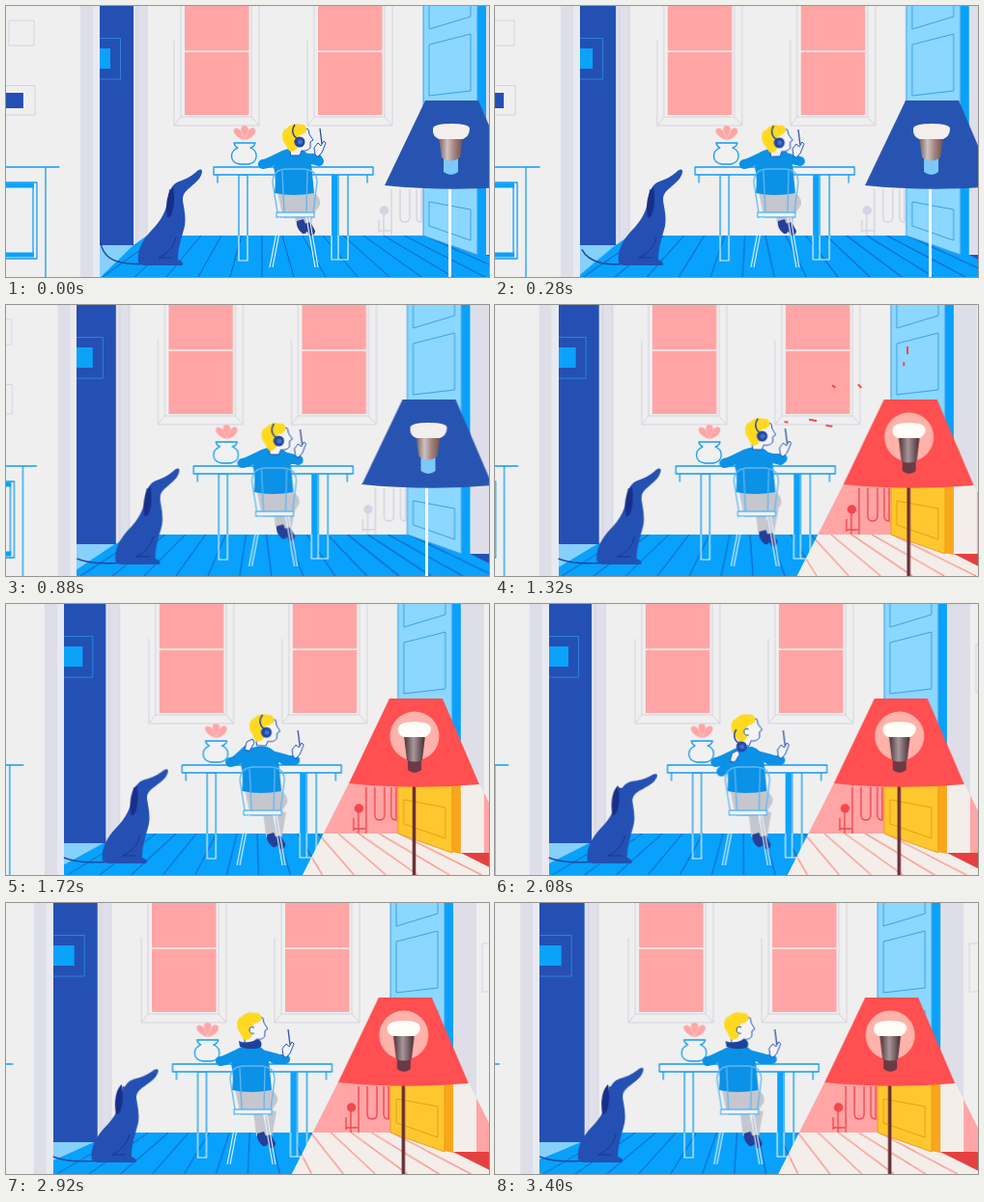
These frames come from a looping animation (500 by 281 pixels, 3440 ms). An HTML page:

```html
<!DOCTYPE html>
<html lang="en">
<head>
<meta charset="utf-8">
<title>Desk lamp</title>
<style>
html, body { margin: 0; width: 100%; height: 100%; overflow: hidden; background: #efefef; }
svg { display: block; width: 100vw; height: 100vh; }
svg * { animation-duration: 3.44s; animation-iteration-count: infinite; }

/* Parallax layers: each drifts left by --dx */
.pan { animation-name: pan; animation-timing-function: cubic-bezier(.2,.47,.5,.85); transform-origin: 0 245px; }
@keyframes pan { to { transform: translateX(var(--dx)) skewX(var(--sk, 0deg)); } }
.wall { --dx: -36px; }
.boards { --dx: -38px; --sk: -19deg; }
.hall { --dx: -39.5px; }
.sill { --dx: -39.5px; --sk: -53deg; }
.near { --dx: -51px; }
.vase { --dx: -40.5px; }
.desk { --dx: -45px; }
.man { --dx: -46.5px; }

/* Room colours, unlit and lit */
#room { --paint: #efefef; --floor: #08a1fb; --seam: #0d63c4; --door: #8bd7ff; --panel: #3f9fe8; --edge: #08a1fb; --jamb: #dedee9; --yard: #2450b3; --pipe: #d3d3e4; }
#lit { --paint: #ffa5a5; --floor: #f3eeea; --seam: #ff8078; --door: #ffc72e; --panel: #ea9d1c; --edge: #f9a61a; --jamb: #f3eeea; --yard: #e5403f; --pipe: #f4474d; }
.paint { fill: var(--paint); } .floor { fill: var(--floor); } .door { fill: var(--door); }
.edge { fill: var(--edge); } .jamb { fill: var(--jamb); } .yard { fill: var(--yard); }
.seam, .panel, .pipe { fill: none; stroke: var(--seam); stroke-width: 1; }
.panel { stroke: var(--panel); } .pipe { stroke: var(--pipe); stroke-width: 1.4; }
.knob { fill: var(--pipe); }

.trim { fill: none; stroke: #d3d3e2; stroke-width: 1; }
.pink { fill: #ffa5a5; }
.navy { fill: #2450b3; }
.ink { fill: none; stroke: #129cf2; stroke-width: 1.3; stroke-linejoin: round; stroke-linecap: round; }
.chalk { fill: none; stroke: #e4f3fc; stroke-width: 1.2; }
.fill { fill: #f1f1f1; }
.sleeve { fill: none; stroke: #0b91e6; stroke-width: 10; stroke-linecap: round; stroke-linejoin: round; }
.skin { fill: #f5f3f3; stroke: #1f55bd; stroke-width: 1; stroke-linejoin: round; stroke-linecap: round; }

.on { animation-name: on; animation-timing-function: step-end; }
.off { animation-name: off; animation-timing-function: step-end; }
@keyframes on { 0% { opacity: 0; } 32.56%, to { opacity: 1; } }
@keyframes off { 0% { opacity: 1; } 32.56%, to { opacity: 0; } }

.head { animation-name: head; transform-origin: 301px 150px; }
@keyframes head {
  0%, 3% { transform: none; }
  8%, 22% { transform: translate(-1px, 1px) rotate(-3deg); }
  27% { transform: translate(0, 0); }
  38% { transform: translate(1px, -5px) rotate(2deg); }
  50% { transform: translate(-1px, -8px) rotate(3deg); }
  71% { transform: translate(-4px, -8px) rotate(-3deg); }
  to { transform: translate(-3px, -9px) rotate(2deg); }
}
.arm { animation-name: arm; }
@keyframes arm {
  0%, 3% { transform: none; }
  8%, 15% { transform: translate(-3px, 1px); }
  26% { transform: translate(1px, 2px); }
  38% { transform: translate(4px, 1px); }
  50%, to { transform: translate(11px, 4px); }
}
.feet { animation-name: feet; }
@keyframes feet { 0%, 20% { transform: none; } 38% { transform: translate(1px, 12px); } 50%, to { transform: translate(3px, 16px); } }
.phones { animation-name: phones; }
@keyframes phones { 0%, 53% { transform: none; opacity: 1; } 62% { transform: translate(-8px, 15px); opacity: 1; } 62.1%, to { transform: translate(-8px, 15px); opacity: 0; } }
.collar { animation-name: collar; animation-timing-function: step-end; }
@keyframes collar { 0% { opacity: 0; } 62%, to { opacity: 1; } }
.lift { animation-name: lift; }
@keyframes lift { 0%, 42% { opacity: 0; transform: translate(-4px, 18px); } 46% { opacity: 1; transform: translate(-2px, 6px); } 50%, 54% { opacity: 1; transform: none; } 62% { opacity: 1; transform: translate(0, 12px); } 65%, to { opacity: 0; transform: translate(-4px, 18px); } }
.nod { animation-name: nod; transform-origin: 176px 200px; }
@keyframes nod { 0%, 38% { transform: none; } 50% { transform: rotate(4deg); } 71% { transform: translate(1px, 1px) rotate(14deg); } to { transform: rotate(3deg); } }
.ear { animation-name: ear; }
@keyframes ear { 0%, 48% { transform: none; } 71%, to { transform: translate(-5px, 0); } }
.tail { animation-name: tail; }
@keyframes tail {
  0% { d: path("M98 244C100 266 122 269 150 267"); }
  15% { d: path("M99 254C108 268 126 269 150 267"); }
  26%, to { d: path("M97 263C112 269 126 268 150 267"); }
}
.bit { stroke: #f5474b; stroke-width: 2; animation-name: bit; animation-timing-function: ease-out; opacity: 0; }
@keyframes bit {
  0%, 32.5% { opacity: 0; transform: scale(.3); }
  32.6% { opacity: 1; transform: scale(.3); }
  38.4% { opacity: 1; transform: none; }
  45%, to { opacity: 0; transform: scale(1.25); }
}
</style>
</head>
<body>
<svg viewBox="0 0 500 281" preserveAspectRatio="none">
  <defs>
    <clipPath id="cone"><path class="pan near" d="M392 186L344 281H575L527 186Z"/></clipPath>
    <linearGradient id="metal"><stop stop-color="#75605f"/><stop offset=".35" stop-color="#d0c3c0"/><stop offset=".65" stop-color="#a4817b"/><stop offset="1" stop-color="#6b5152"/></linearGradient>
    <linearGradient id="dark"><stop stop-color="#4a2c33"/><stop offset=".45" stop-color="#a8989a"/><stop offset="1" stop-color="#452830"/></linearGradient>
  </defs>

  <g id="room">
    <rect class="floor" y="230" width="500" height="51"/>
    <path class="seam pan boards" id="seams"/>
    <g class="pan wall">
      <rect class="paint" x="60" y="-1" width="540" height="239"/>
      <g id="windows"></g>
      <g class="pipe">
        <circle class="knob" cx="391.500" cy="212" r="4"/>
        <path d="M391 216V238M386 222V235M386 233H398M399 190V238M408 190V219Q408 224 413 224T418 219V190M425 190V219Q425 224 430 224V190"/>
      </g>
      <rect class="paint" x="496" y="-1" width="140" height="259"/>
      <path class="yard" d="M497 258H640V330Z"/>
      <rect class="jamb" x="496" y="-1" width="25" height="259"/>
      <path class="trim" d="M545 42H527V92H545"/>
      <path class="edge" d="M487 -1H497V259L487 257Z"/>
      <path class="door" d="M432 -1H488V258L432 238Z"/>
      <path class="panel" d="M432 0V238L488 258V0M438 0V24L481 11V0M438 40L481 29V88L438 93ZM438 116L481 112V188H438ZM438 203L481 211V243L438 228Z"/>
    </g>
  </g>
  <g class="on"><g id="lit" clip-path="url(#cone)"></g></g>

  <path class="pan sill" d="M-20 247H133L98 281H-20Z" fill="#86d0fb"/>
  <g class="pan hall">
    <rect class="navy" x="40" y="-1" width="93" height="249"/>
    <path d="M84 33.500H118.500V76H84Z" fill="none" stroke="#2b83dd"/>
    <rect x="84" y="44" width="24" height="21" fill="#0ba2fa"/>
    <path d="M132 0H146V238L132 248Z" fill="#e0e0ea"/>
    <path class="trim" d="M136 0V245M146 0V238"/>
  </g>
  <g class="pan near">
    <rect x="-20" y="-1" width="117" height="283" fill="#efefef"/>
    <rect x="77" y="-1" width="13" height="283" fill="#dedee9"/>
    <rect x="90" y="-1" width="7" height="283" fill="#e9e9f0"/>
    <path class="trim" d="M3 15H29V41H3ZM-2 82.500H30V113H-2"/>
    <rect class="navy" x="-2" y="90" width="20" height="16"/>
    <path class="ink" d="M-4 167H55M41 167V281M-4 183H32V262H-4M28 188V256"/>
    <path d="M-4 186H29M-4 258H29" stroke="#0ba2fa" stroke-width="5"/>
  </g>

  <g class="pan near">
    <path class="tail" d="M98 244C100 266 122 269 150 267" fill="none" stroke="#24479f" stroke-width="1.5"/>
    <path class="navy" d="M169 190C168 206 164 218 154 229C143 240 135 252 137 266L142 269H182C185 267 181 264 178 263C178 250 182 240 185 228C187 217 183 206 182 194Z"/>
    <g class="nod">
      <path class="navy" d="M203 171C202 168 199 170 197 172C191 177 185 180 179 182C173 184 169 190 168 199C172 208 182 208 183 200C183 193 189 190 194 185C199 181 203 176 203 171Z"/>
    </g>
    <path class="ear" d="M173 188C166 194 165 208 167 219C172 221 176 205 173 188Z" fill="#172f8a"/>
    <path d="M176 240C174 249 167 257 158 261H172" fill="none" stroke="#17358f"/>
  </g>

  <g class="pan desk">
    <path d="M340 175V263" stroke="#0ba2fa" stroke-width="6"/>
    <path class="ink" d="M241 238V175H250V238M344 238V175M354 238V175M219 175V183M374 175V183"/>
    <path class="chalk" d="M241 238V264H250V238M337 238V263H354V238M344 238V263"/>
    <path class="ink fill" d="M215 167H380V175H215Z"/>
  </g>

  <g class="pan vase">
    <path class="pink" d="M247 139C238 137 233 129 237 127C242 125 246 133 247 139C241 128 243 124 247 124C251 124 253 129 247 139C248 132 253 124 257 127C261 130 255 138 247 139Z" stroke="#f9c9c9" stroke-width=".5"/>
    <path class="ink fill" d="M236 142H258C257 146 253 147 253 147C262 151 261 162 251 164H242C231 162 231 151 240 147C240 147 237 146 236 142Z"/>
  </g>

  <g class="pan man">
    <g class="feet">
      <path d="M302 199L305 225M316 199L311 227" stroke="#c5c6ce" stroke-width="10"/>
      <path d="M301 223L308 221L312 231Q312 237 307 236Q300 231 301 223ZM308 226L315 224L320 233Q320 239 314 238Z" fill="#253f96"/>
    </g>
    <path d="M281 192H313Q326 195 325 206L318 217H286Z" fill="#c5c6ce"/>
    <path class="sleeve" d="M286 156C277 159 273 163 266 164"/>
    <path d="M282 152Q292 146 304 148Q314 151 316 163L319 194Q297 198 278 194Q280 177 277 167Z" fill="#0b91e6"/>
    <path class="sleeve" d="M305 156L324 161"/>
    <g class="arm">
      <path class="sleeve" d="M311 158L322 158" stroke-width="8"/>
      <path class="skin" d="M320 154L319 147L323 142L326 145L329 140L331 142L329 147L327 152L323 156Z"/>
      <path d="M325 127L327 143" stroke="#24479f" stroke-width="1.3"/>
    </g>
    <g class="lift">
      <path class="sleeve" d="M272 162L284 151" stroke-width="8"/>
      <path class="skin" d="M281 151L283 143L289 140L291 144L286 152Z"/>
    </g>
    <g class="head">
      <path class="skin" d="M294 150L293 132L305 125L313 128L314 133L318 139L315 141L315 147Q312 151 306 150L304 155H295Z"/>
      <path d="M289 143C284 137 286 127 291 127C293 123 301 121 304 123C307 122 312 123 311 130Q307 134 303 134L302 146Q298 153 293 150Z" fill="#ffd91f"/>
      <path d="M304 138Q299 136 299 141Q300 145 304 144" fill="#f5f3f3" stroke="#1f55bd"/>
      <g class="phones">
        <path d="M303 139Q293 132 299 123" fill="none" stroke="#24479f" stroke-width="1.500"/>
        <circle cx="304" cy="141" r="5.500" fill="#24479f"/>
        <circle cx="304.500" cy="141" r="2.500" fill="#3e72cb"/>
      </g>
    </g>
    <path class="collar" d="M285 143Q292 147 305 141Q311 145 307 150Q296 153 286 149Z" fill="#1d4299"/>
    <g class="ink" style="stroke:#5db9f3">
      <path d="M281 214L276 183Q276 169 291 169H307Q322 169 322 183L318 214M288 214L286 171M311 214L312 171"/>
      <path class="fill" d="M280 214H319V219H280Z"/>
    </g>
    <path class="chalk" d="M283 219L273 271M286 219L276 271M314 219L323 271M311 219L320 271"/>
  </g>

  <g class="pan near">
    <path d="M459.500 188V281" stroke="#f4f4f7" stroke-width="3" class="off"/>
    <path d="M459.500 188V281" stroke="#693039" stroke-width="3.500" class="on"/>
    <path class="off" d="M434 98H489L527 187Q460 193 392 186Z" fill="#2854b1"/>
    <path class="on" d="M434 98H489L527 187Q460 193 392 186Z" fill="#ff4f50"/>
    <g class="off">
      <path d="M453 158H468V172Q461 178 453 172Z" fill="#7cc8fa"/>
      <path d="M448 136H473L470 157Q461 164 451 157Z" fill="url(#metal)"/>
      <path d="M442 127Q443 122 461 122T480 127Q480 135 473 138H448Q441 135 442 127Z" fill="#f3efec"/>
    </g>
    <g class="on">
      <circle cx="460" cy="137" r="25.500" fill="#ffb2aa"/>
      <path d="M453 160H467V172Q460 178 453 172Z" fill="#6b3a44"/>
      <path d="M449 136H471L468 162Q460 165 452 162Z" fill="url(#dark)"/>
      <path d="M443 129Q444 122 460 122T477 129Q477 135 471 138H448Q442 135 443 129Z" fill="#fffdf8"/>
    </g>
    <g id="burst" transform="translate(460 137)"></g>
  </g>
</svg>
<script>
const $ = id => document.getElementById(id);

// Two identical windows
$('windows').innerHTML = [0, 138].map(x => `<g transform="translate(${x})">
  <path class="trim" d="M174 36V124H262V0M181 0V115H254V0M174 124L181 115M262 124L254 115"/>
  <rect class="pink" x="185" y="-1" width="66.500" height="114"/>
  <path d="M185 47H251.500" stroke="#fff1f1" stroke-width="1.500"/></g>`).join('');

// Floorboards fan out from one vanishing point
let d = '';
for (let i = -9; i < 16; i++) {
  const x = 265 + i * 21;
  d += `M${x} 238L${x + i * 12} 281`;
}
$('seams').setAttribute('d', d);
$('lit').innerHTML = $('room').innerHTML.replace(/ id="\w+"/g, '');

// Sparks: angle, distance, length
$('burst').innerHTML = [[190, 97, 8], [188, 80, 7], [187, 126, 4], [226, 71, 5], [269, 86, 8], [266, 74, 4], [214, 92, 4]]
  .map(([a, r, n]) => `<g transform="rotate(${a})"><path class="bit" d="M${r} 0h${n}"/></g>`).join('');
</script>
</body>
</html>
```
